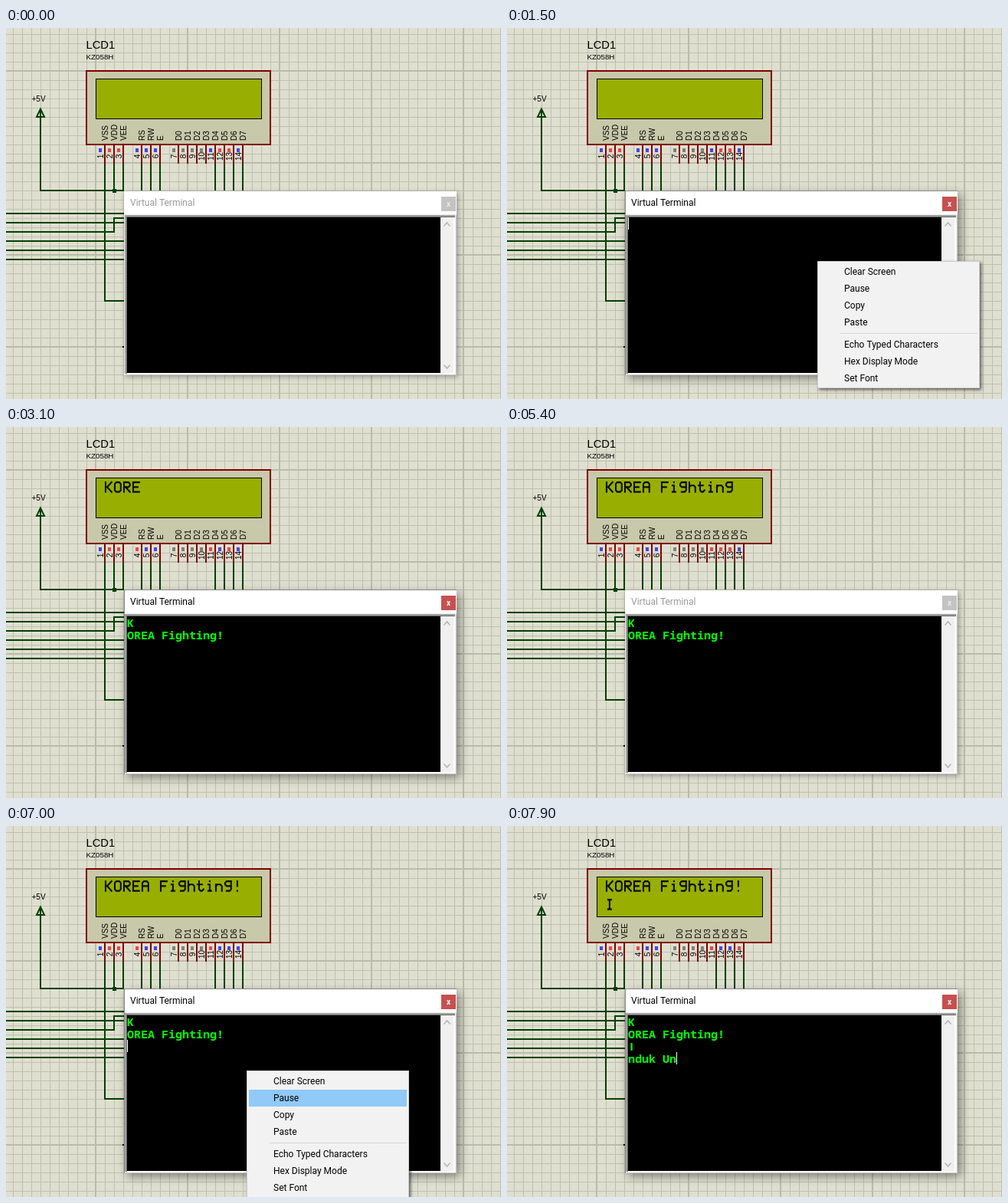
Recreate the animation shown at these times as an HTML page with a canvas. Size 646x484 px, loop 8000 ms.

```html
<!DOCTYPE html>
<html lang="en">
<head>
<meta charset="utf-8">
<title>LCD and virtual terminal</title>
<style>
html, body { margin: 0; width: 100%; height: 100%; overflow: hidden; }
canvas { display: block; }
</style>
</head>
<body>
<canvas id="stage" width="646" height="484"></canvas>
<script>
const ctx = document.getElementById('stage').getContext('2d');
const W = 646, H = 484, LOOP = 8000, TICK = 100, CELL = 12;
const GREEN = '#004000', MAROON = '#800000', RED = '#f04444', BLUE = '#4444f0', GREY = '#808078';
const LABEL = '"Liberation Sans", Arial, sans-serif';
const UI = '12px Roboto, sans-serif';
const MONO = 'bold 15px "Noto Sans Mono", monospace';

const MENU = ['Clear Screen', 'Pause', 'Copy', 'Paste', 'Echo Typed Characters', 'Hex Display Mode', 'Set Font'];
const PINS = 'VSS VDD VEE - RS RW E - D0 D1 D2 D3 D4 D5 D6 D7'.split(' ');
const FIRST = 'KOREA Fighting!', SECOND = 'I\nnduk Un';

// LCD letters as strokes on a grid of 5 by 7 dots
const STROKES = {
  K: 'M0 0V6M4 0L1 3L4 6',
  O: 'M1 0H3L4 1V5L3 6H1L0 5V1Z',
  R: 'M0 6V0H3L4 1V2L3 3H0M1 3L4 6',
  E: 'M4 0H0V6H4M0 3H3',
  A: 'M0 6V1L1 0H3L4 1V6M0 3H4',
  F: 'M0 6V0H4M0 3H3',
  i: 'M2 0h.01M1 2H2V6M1 6H3',
  g: 'M4 3H1L0 2V1L1 0H4V5L3 6H1',
  h: 'M0 0V6M0 3L1 2H3L4 3V6',
  t: 'M1 0V5L2 6H3L4 5M0 2H3',
  n: 'M0 2V6M0 3L1 2H3L4 3V6',
  '!': 'M2 0V3M2 6h.01',
  I: 'M1 0H3M2 0V6M1 6H3',
  ' ': ''
};

const clamp = (v, lo, hi) => Math.min(hi, Math.max(lo, v));
const between = (t, a, b) => t >= a && t < b;

// Characters of a pasted text that have arrived, one every 16 ms
const pasted = (str, start, t) => str.slice(0, clamp(Math.floor((t - start) / 16), 0, str.length));

function rect(x, y, w, h, color) {
  ctx.fillStyle = color;
  ctx.fillRect(x, y, w, h);
}

function line(color, width, ...pts) {
  ctx.strokeStyle = color;
  ctx.lineWidth = width;
  ctx.beginPath();
  for (let i = 0; i < pts.length; i += 2) ctx.lineTo(pts[i], pts[i + 1]);
  ctx.stroke();
}

function frame(x, y, w, h, color, width) {
  ctx.strokeStyle = color;
  ctx.lineWidth = width;
  ctx.strokeRect(x, y, w, h);
}

function text(str, x, y, font, color = '#000', align = 'left') {
  ctx.font = font;
  ctx.fillStyle = color;
  ctx.textAlign = align;
  ctx.fillText(str, x, y);
}

function upright(str, x, y, align) {
  ctx.save();
  ctx.translate(x, y);
  ctx.rotate(-Math.PI / 2);
  text(str, 0, 0, '10px ' + LABEL, '#000', align);
  ctx.restore();
}

function shadowed(x, y, w, h, color, blur, offset, alpha) {
  ctx.save();
  ctx.shadowColor = `rgba(0,0,0,${alpha})`;
  ctx.shadowBlur = blur;
  ctx.shadowOffsetX = ctx.shadowOffsetY = offset;
  rect(x, y, w, h, color);
  ctx.restore();
}

function gridLines(step, width, color) {
  const shift = width - 1;
  for (let x = 117 % step; x < W; x += step) rect(x - shift, 0, width, H, color);
  for (let y = 56 % step; y < H; y += step) rect(0, y - shift, W, width, color);
}

function drawGrid() {
  rect(0, 0, W, H, '#dfdfd0');
  gridLines(CELL, 1, '#c0c0b1');
  gridLines(CELL * 10, 2, '#bbbbac');
}

function drawWires() {
  line(GREEN, 2, 45, 105, 45, 212, 154, 212);
  line(GREEN, 2, 45, 116, 40, 116, 45, 105.5, 50, 116, 45, 116);
  text('+5V', 33.5, 96, '10px ' + LABEL);
  line(GREEN, 2, 129, 176, 129, 356, 154, 356);
  line(GREEN, 2, 0, 266, 141, 266, 141, 248, 154, 248);
  for (let y = 242; y <= 302; y += CELL) if (y !== 266) line(GREEN, 2, 0, y, 154, y);
  rect(139, 210, 5, 5, GREEN);
  rect(152, 415, 2, 2, '#000');
}

function pinColor(name, last) {
  const bit = name[0] === 'D' ? name[1] - 4 : NaN;
  if (bit < 0) return GREY;
  if (bit >= 0) return (last ? last.charCodeAt(0) : 6) >> bit & 1 ? RED : BLUE;
  return name === 'VDD' || name === 'VEE' || name === 'RS' && last ? RED : BLUE;
}

function drawPins(last) {
  let num = 0;
  PINS.forEach((name, i) => {
    if (name === '-') return;
    const x = 129 + i * CELL, color = pinColor(name, last);
    num++;
    if (color !== GREY) line(GREEN, 2, x, 176, x, 212);
    line(MAROON, 2, x, 153, x, 177);
    upright(name, x + 3.5, 147, 'left');
    upright(num, x - 2.5, 167.5, 'center');
    rect(x - 8, 157, 4, 5, color);
  });
}

function drawGlyph(ch, x, y) {
  ctx.save();
  ctx.translate(x, y);
  ctx.scale(1.95, 2.1);
  ctx.translate(.5, .5);
  ctx.lineWidth = 1.05;
  ctx.lineCap = 'square';
  ctx.strokeStyle = '#0a0c00';
  ctx.stroke(new Path2D(STROKES[ch]));
  ctx.restore();
}

function drawLcd(t, typed) {
  // The LCD follows at a slower, steady pace
  const count = clamp(Math.floor((t - 2350) / 231) + 1, 0, FIRST.length);
  const rows = [FIRST.slice(0, count), typed.slice(0, 1)];
  text('LCD1', 104.5, 27, '14.7px ' + LABEL);
  text('KZ058H', 104.5, 41, '9.8px ' + LABEL);
  rect(105, 56, 240, 96, '#c8c8aa');
  frame(105, 56, 240, 96, MAROON, 2);
  rect(117, 66, 217, 53, '#000');
  rect(118, 67, 215, 51, '#98ae00');
  drawPins(rows.join('').slice(-1));
  rows.forEach((str, row) =>
    [...str].forEach((ch, col) => drawGlyph(ch, 129 + col * CELL, 71 + row * 24)));
}

function drawWindow(active) {
  shadowed(154, 213, 434, 240, '#f0f0f0', active ? 12 : 7, active ? 4 : 2, active ? .45 : .35);
  rect(154, 213, 434, 30, '#fff');
  if (active) line('#8a8a8a', 1, 154.5, 453, 154.5, 212.5, 588, 212.5);
  text('Virtual Terminal', 162, 232, UI, active ? '#000' : '#999');
  rect(568, 220, 19, 19, active ? '#c75050' : '#c3c3c3');
  text('x', 577.5, 233, 'bold 10px Roboto, sans-serif', active ? '#fff' : '#e9e9e9', 'center');

  rect(155, 244, 431, 207, '#a0a0a0');
  rect(157, 246, 429, 205, '#696969');
  rect(158, 247, 428, 205, '#fff');
  rect(158, 247, 409, 203, '#000');
  rect(567, 247, 17, 203, '#f0f0f0');
  line('#c8c8c8', 1, 155, 452.5, 587.5, 452.5, 587.5, 244);
  for (const [y, d] of [[256, 1], [442, -1]])
    line('#b5b5b5', 1.5, 571.5, y + 2.5 * d, 575.5, y - 2 * d, 579.5, y + 2.5 * d);
}

function drawTerminal(t, typed) {
  const active = between(t, 1300, 3800) || t >= 6300;
  drawWindow(active);
  const lines = (pasted('K\nOREA Fighting!\n', 2300, t) + typed).split('\n');
  lines.forEach((str, row) => [...str].forEach((ch, col) =>
    text(ch, 162.5 + col * 9, 261 + row * 16, ch === 'I' ? 'bold 15px ' + LABEL : MONO, '#00ff00', 'center')));
  if (active && !between(t, 3100, 3600)) {
    const row = lines.length - 1;
    rect(158 + lines[row].length * 9, 247 + row * 16, 1, 16, '#fff');
  }
}

// Fades in, the highlight walks down to Paste, then fades out
function drawMenu(x, y, age) {
  const step = Math.floor(age / TICK);
  if (!between(step, 0, 10)) return;
  const hot = step < 6 ? Math.min(step - 2, 2) : 3;
  ctx.save();
  ctx.globalAlpha = step === 0 || step === 9 ? .45 : 1;
  ctx.translate(x, y);
  shadowed(0, 0, 212, 166, '#cccccc', 4, 2, .6);
  rect(1, 1, 210, 164, '#f2f2f2');
  if (hot >= 0) rect(3, 3 + hot * 22, 206, 22, '#91c9f7');
  rect(30, 94, 179, 1, '#d7d7d7');
  MENU.forEach((item, i) => text(item, 35, 18 + i * 22 + (i > 3 ? 7 : 0), UI));
  ctx.restore();
}

function draw(now) {
  const t = Math.floor(now % LOOP / TICK) * TICK;
  const typed = pasted(SECOND, 7750, t);
  drawGrid();
  drawWires();
  drawLcd(t, typed);
  drawTerminal(t, typed);
  drawMenu(405, 304, t - 1400);
  drawMenu(314, 319, t - 6700);
}

const start = performance.now();
function tick() {
  draw(performance.now() - start);
  requestAnimationFrame(tick);
}
tick();
</script>
</body>
</html>
```
